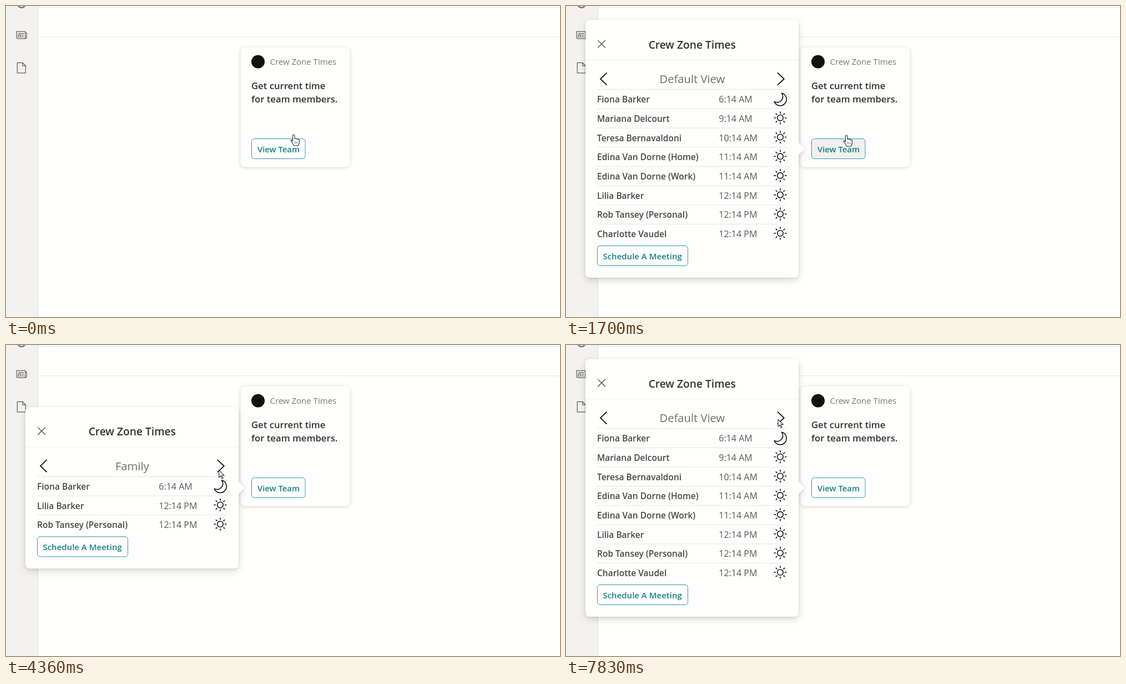
Animation, 998 px wide and 561 px high, one loop 8 s. Source, as an HTML page:

```html
<!DOCTYPE html>
<html lang="en">
<head>
<meta charset="utf-8">
<title>Crew Zone Times</title>
<style>
  html, body { margin: 0; width: 100%; height: 100%; overflow: hidden; background: #fefefd; }
  svg { display: block; width: 998px; height: 561px; }
  text { font-family: "Open Sans", "Noto Sans", sans-serif; fill: #323130; }
  .semi { font-weight: 600; }
  .name { font-size: 15.5px; font-weight: 600; fill: #484644; }
  .time { font-size: 16px; fill: #5a5856; }
  .btn { fill: #fefefd; stroke: #2b9ba2; }
  .btn-label { font-weight: 600; fill: #158088; text-anchor: middle; }
  .line { stroke: #e6e5e3; }
  .ink { fill: none; stroke: #111; stroke-width: 1.6; }
  .side { fill: none; stroke: #5c5a58; stroke-width: 1.2; }
  .cursor { fill: #fff; stroke: #2b2b2b; stroke-width: 1.1; stroke-linejoin: round; }
  #card { filter: drop-shadow(0 1.5px 3px rgba(0,0,0,.17)); }
  .sheet { fill: #fefefd; filter: drop-shadow(0 5px 7px rgba(0,0,0,.13)) drop-shadow(0 1px 2px rgba(0,0,0,.1)); }
</style>
</head>
<body>
<svg viewBox="0 0 998 561">
  <defs>
    <g id="sun" class="ink"><circle r="5.3"/></g>
    <path id="moon" class="ink" stroke-linejoin="round" d="M2.5-11.2A11.4 11.4 0 1 1-10.8 4A10.3 10.3 0 0 0 2.5-11.2Z"/>
  </defs>
  <rect width="998" height="561" fill="#fefefd"/>
  <path class="line" d="M57 2.2H998M57 55.6H998"/>
  <rect width="57" height="561" fill="#f3f2f1"/>
  <path d="M57.5 0V561" stroke="#e3e1df"/>
  <g class="side">
    <circle cx="28" cy="-4.7" r="8"/>
    <ellipse cx="28" cy="-4.7" rx="3.8" ry="8"/>
    <path d="M21 -.7H35"/>
    <path d="M19.2 46.2H34.6V58.8H21.2Q19.2 58.8 19.2 56.8ZM34.6 48.6H37.2V56.5Q37.2 58.8 34.6 58.8M22 49.6H32M22 52.4H26.4V56H22ZM28.4 52.6H32M28.4 55.6H32"/>
    <path d="M20.3 102.3H29.8L35.3 107.8V120.9H20.3ZM29.8 102.3V107.8H35.3"/>
  </g>
  <rect id="card" x="422.5" y="74.5" width="197" height="216" rx="8" fill="#fefefd"/>
  <circle id="logo" cx="454" cy="100.5" r="12" fill="#111"/>
  <text x="475.5" y="105.8" font-size="15" style="fill:#797775">Crew Zone Times</text>
  <g class="semi" font-size="16.7">
    <text x="442" y="150">Get current time</text>
    <text x="442" y="174">for team members.</text>
  </g>
  <rect id="view" class="btn" x="442.5" y="239.5" width="96.5" height="36" rx="5"/>
  <text class="btn-label" x="491" y="263.6" font-size="14.8">View Team</text>
  <g id="panels"></g>
  <g id="hand">
    <path class="cursor" d="M-1.5 12V2C-1.5-.4 2-.4 2 2V7.5C2.5 6.3 5 6.5 5.2 8C6 7 8 7.5 8 9C9 8.2 10.5 9 10.5 10.5V14C10.5 17 8.5 18 8.5 20H.5C.5 18-3.5 14-4.5 11.5C-5 9.5-3 9-1.5 12Z"/>
    <path d="M2.2 12.5V16.5M4.7 12.5V16.5M7.2 12.5V16.5" stroke="#555" stroke-width=".8"/>
  </g>
  <path id="arrow" class="cursor" d="M0 0V13L3 10.3L5.2 15.2L7.3 14.3L5.1 9.5H9.3Z"/>
</svg>
<script>
const LOOP = 8000, PITCH = 34.7, MIDDLE = 257.6, LEAVE = 2130;
const $ = id => document.getElementById(id);

const person = (name, time, group) => ({ name, time, group });
const people = [
  person("Fiona Barker", "6:14 AM", "Family"),
  person("Mariana Delcourt", "9:14 AM", "Friends"),
  person("Teresa Bernavaldoni", "10:14 AM", "Friends"),
  person("Edina Van Dorne (Home)", "11:14 AM", "Friends"),
  person("Edina Van Dorne (Work)", "11:14 AM", "Friends"),
  person("Lilia Barker", "12:14 PM", "Family"),
  person("Rob Tansey (Personal)", "12:14 PM", "Family"),
  person("Charlotte Vaudel", "12:14 PM", "Friends")
];

// The logo blinks off for a moment whenever the panel changes
const scenes = [
  { at: 860, view: "Default View", blink: 300 },
  { at: 3400, view: "Family", blink: 400 },
  { at: 5260, view: "Friends", blink: 240 },
  { at: 7030, view: "Default View", blink: 30 }
];

// Pointer stops: the time the move starts and ends, and where it arrives
const stop = (from, to, x, y) => ({ from, to, x, y });
const stops = [
  stop(0, 0, 518, 232),
  stop(30, 140, 488, 264),
  stop(140, 260, 499, 248),
  stop(1700, 1700, 505, 233),
  stop(1960, 2200, 549, 279),
  stop(2200, 2560, 386, 135),
  stop(3800, 4030, 383, 235),
  stop(4300, 4400, 384, 221),
  stop(5500, 5660, 381, 211),
  stop(5860, 6100, 379, 188),
  stop(6300, 6430, 385, 188),
  stop(7260, 7530, 383, 143),
  stop(7730, 7830, 382, 134)
];

let rays = "";
for (let i = 0; i < 8; i++) {
  const c = Math.cos(i * Math.PI / 4), s = Math.sin(i * Math.PI / 4);
  rays += `M${7.9 * c} ${7.9 * s}L${11.5 * c} ${11.5 * s}`;
}
$("sun").innerHTML += `<path d="${rays}"/>`;

function row({ name, time }, i) {
  const y = 143.2 + i * PITCH, night = parseInt(time) < 7;
  return `<path class="line" d="M56 ${y - 17.9}H398"/>
    <text class="name" x="56" y="${y + 5.8}">${name}</text>
    <text class="time" x="275.3" y="${y + 5.8}">${time}</text>
    <use href="#${night ? "moon" : "sun"}" x="386" y="${night ? y : y - 1.4}"/>`;
}

function panel({ view }) {
  const rows = people.filter(p => view === "Default View" || p.group === view);
  const list = PITCH * rows.length, h = 187 + list, m = h / 2, by = 129.6 + list;
  return `<g><g transform="translate(0 ${MIDDLE - m})">
    <path class="sheet" d="M43 0H411Q419 0 419 8V${m - 11}L430.5 ${m}L419 ${m + 11}V${h - 8}Q419 ${h} 411 ${h}H43Q35 ${h} 35 ${h - 8}V8Q35 0 43 0Z"/>
    <path d="M57.3 36.3L70.9 49.9M70.9 36.3L57.3 49.9" stroke="#444" stroke-width="1.3"/>
    <text class="semi" x="227.3" y="51.4" text-anchor="middle" font-size="19.2">Crew Zone Times</text>
    <path d="M35 72H419" stroke="#f0efee"/>
    <path class="ink" style="stroke-width:1.8" d="M73.5 95L62 106.2L73.5 117.4M381 95L392.8 106.2L381 117.4"/>
    <text x="227.3" y="113.6" text-anchor="middle" font-size="20.2" style="fill:#706e6c">${view}</text>
    ${rows.map(row).join("")}
    <rect class="btn" x="56.5" y="${by}" width="163" height="36" rx="5"/>
    <text class="btn-label" x="137.6" y="${by + 24.2}" font-size="15">Schedule A Meeting</text>
  </g></g>`;
}
$("panels").innerHTML = scenes.map(panel).join("");
const panels = [...$("panels").children];

function pointer(t) {
  let { x, y } = stops[0];
  for (const s of stops) {
    if (t < s.from) break;
    const k = s.to > s.from ? Math.min(1, (t - s.from) / (s.to - s.from)) : 1;
    const ease = k * k * (3 - 2 * k);
    x += (s.x - x) * ease;
    y += (s.y - y) * ease;
  }
  return `translate(${x} ${y})`;
}

// The panel stalls as it opens, then glides home
const slide = t => 8 * Math.exp(-(t < 1030 ? 0 : t - 860) / 95);

const show = (el, on) => el.setAttribute("visibility", on ? "visible" : "hidden");

function draw(t) {
  const current = scenes.filter(s => t >= s.at).length - 1;
  panels.forEach((el, i) => {
    el.style.display = i === current ? "" : "none";
    el.setAttribute("transform", `translate(${slide(t)} 0)`);
    el.setAttribute("opacity", t < 1030 ? 0.9 : 1);
  });
  show($("logo"), !scenes.some(s => t >= s.at && t < s.at + s.blink));
  $("view").style.fill = t >= 90 && t < LEAVE ? "#f1f0ef" : "";
  for (const id of ["hand", "arrow"]) {
    $(id).setAttribute("transform", pointer(t));
    show($(id), (id === "hand") === (t < LEAVE));
  }
}

const begin = performance.now();
function tick() {
  draw((performance.now() - begin) % LOOP);
  requestAnimationFrame(tick);
}
tick();
</script>
</body>
</html>
```
